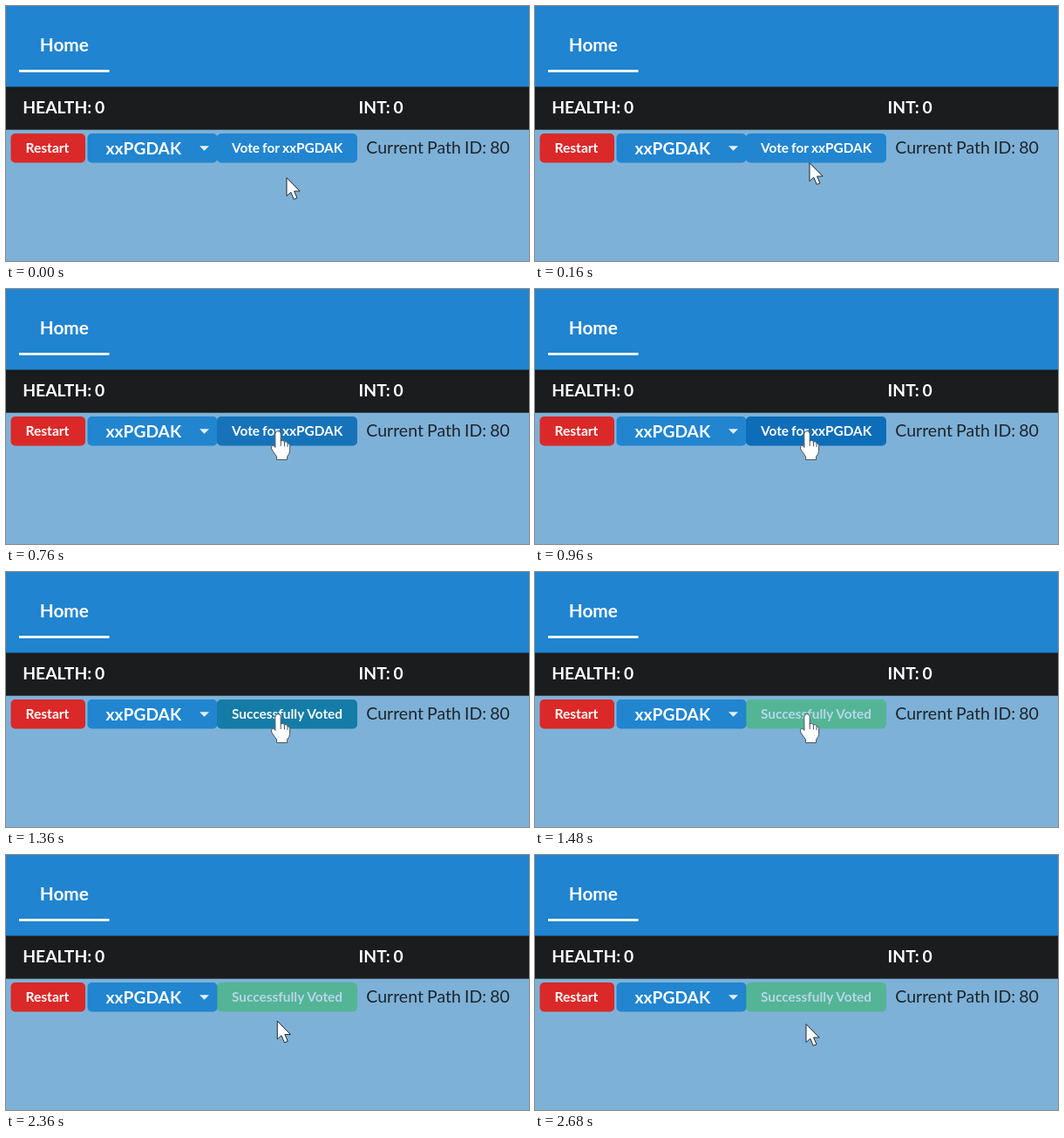
Write an HTML page with a canvas that moves like this. It is 600 by 292 pixels and loops after 3.4 s.

```html
<!DOCTYPE html>
<html lang="en">
<head>
<meta charset="utf-8">
<title>Vote button</title>
<style>
html, body { margin: 0; width: 100%; height: 100%; overflow: hidden; background: #7eb1d7; }
canvas { display: block; width: 600px; height: 292px; }
</style>
</head>
<body>
<canvas id="stage"></canvas>
<script>
const W = 600, H = 292, LOOP = 3400, STEP = 40;
const NAME = 'xxPGDAK';
const BLUE = [33, 133, 208], HOVER = [22, 117, 190], PRESS = [26, 105, 164],
      FOCUS = [13, 109, 184], GREEN = [33, 186, 69];

const canvas = document.getElementById('stage');
const ctx = canvas.getContext('2d');
const dpr = window.devicePixelRatio || 1;
canvas.width = W * dpr;
canvas.height = H * dpr;
ctx.scale(dpr, dpr);

const HAND = new Path2D('M-3.2 3.4Q-3.2 0 0 0Q3.2 0 3.2 3.4V11.5Q6 10 7.6 12.4Q10 11.4 11 14' +
  'Q13.6 14 13.6 17V23Q13.4 26 10.6 29.5V33H-1.4V29.5L-7 21.5Q-8.6 17.2-5.6 16.8Q-4.2 16.8-3.2 18.6Z');
const KNUCKLES = new Path2D('M3.2 11.5V17M7.4 12.6V17.5M11 14.2V18');
const ARROW = new Path2D('M0 0V20.5L4.8 16.2L8.3 24.4L12 22.8L8.6 15H14.8Z');

const clamp = v => Math.max(0, Math.min(1, v));
const mix = (a, b, p) => a + (b - a) * p;
const mixAll = (a, b, p) => a.map((v, i) => mix(v, b[i], p));
const rgb = c => `rgb(${c.map(Math.round).join(',')})`;
const smooth = p => p * p * (3 - 2 * p);

// Interpolates [time, value...] keys linearly.
function track(keys, t) {
  let i = 0;
  while (i < keys.length - 1 && t >= keys[i + 1][0]) i++;
  const a = keys[i], b = keys[i + 1] || a;
  const p = a === b ? 0 : clamp((t - a[0]) / (b[0] - a[0]));
  return mixAll(a.slice(1), b.slice(1), p);
}

const POINTER = [
  [0, 322, 197], [40, 322, 197], [160, 315, 180], [240, 313, 167], [320, 312, 162.5],
  [2120, 312, 162.5], [2160, 312, 163.3], [2240, 312, 174], [2320, 311.5, 187],
  [2400, 311, 194]
];
const BUTTON = [
  [0, ...BLUE], [180, ...BLUE], [320, ...HOVER], [740, ...HOVER],
  [840, ...PRESS], [960, ...FOCUS], [1340, ...FOCUS], [1460, ...GREEN]
];

function rect(x, y, w, h, fill) {
  ctx.fillStyle = fill;
  ctx.fillRect(x, y, w, h);
}

function pill(x, w, fill) {
  ctx.fillStyle = fill;
  ctx.beginPath();
  ctx.roundRect(x, 146, w, 33.5, 5);
  ctx.fill();
}

function label(text, x, y, size, weight = 700, fill = '#fff') {
  ctx.font = `${weight} ${size}px Lato, sans-serif`;
  ctx.wordSpacing = `${-size * 0.045}px`;
  ctx.fillStyle = fill;
  ctx.fillText(text, x, y);
}

function drawPage() {
  rect(0, 0, W, H, '#7eb1d7');
  rect(0, 0, W, 93, '#2084d0');
  rect(0, 92.5, W, 49.2, '#1b1c1d');
  rect(15, 73, 103.5, 2.8, '#fff');
  label('Home', 38.7, 52, 20.8);
  label('HEALTH: 0', 19.2, 122.5, 19.3);
  label('INT: 0', 404.6, 122.5, 19.3);
  pill(5.5, 85.5, '#db2828');
  label('Restart', 22.4, 168.3, 15.6);
  pill(93.5, 149, rgb(BLUE));
  label(NAME, 114.6, 169.6, 19.2);
  ctx.fillStyle = '#e4f0f9';
  ctx.beginPath();
  ctx.moveTo(222, 160.3);
  ctx.lineTo(233, 160.3);
  ctx.lineTo(227.5, 165.8);
  ctx.fill();
  label('Current Path ID: 80', 413.3, 169.4, 19.5, 400, '#1d252c');
}

function drawVote(t) {
  const fade = smooth(clamp((t - 1340) / 120));
  ctx.globalAlpha = mix(1, 0.45, fade);
  pill(242, 161, rgb(track(BUTTON, t)));
  ctx.globalAlpha = 1;
  const ink = rgb(mixAll([255, 255, 255], [184, 213, 234], fade));
  label(t < 1360 ? 'Vote for ' + NAME : 'Successfully Voted', 259, 168.3, 15.4, 700, ink);
}

function drawPointer(t) {
  const [x, y] = track(POINTER, t);
  const over = y < 179.5;
  const shape = over ? HAND : ARROW;
  ctx.save();
  ctx.translate(x, y);
  ctx.lineJoin = 'round';
  ctx.lineCap = 'round';
  ctx.lineWidth = 1;
  ctx.strokeStyle = over ? '#46525e' : '#20272e';
  ctx.fillStyle = '#fff';
  ctx.fill(shape);
  ctx.stroke(shape);
  if (over) ctx.stroke(KNUCKLES);
  ctx.restore();
}

function draw(now) {
  const t = Math.floor((now % LOOP) / STEP) * STEP;
  drawPage();
  drawVote(t);
  drawPointer(t);
}

const start = performance.now();
function tick() {
  draw(performance.now() - start);
  requestAnimationFrame(tick);
}
tick();
</script>
</body>
</html>
```
